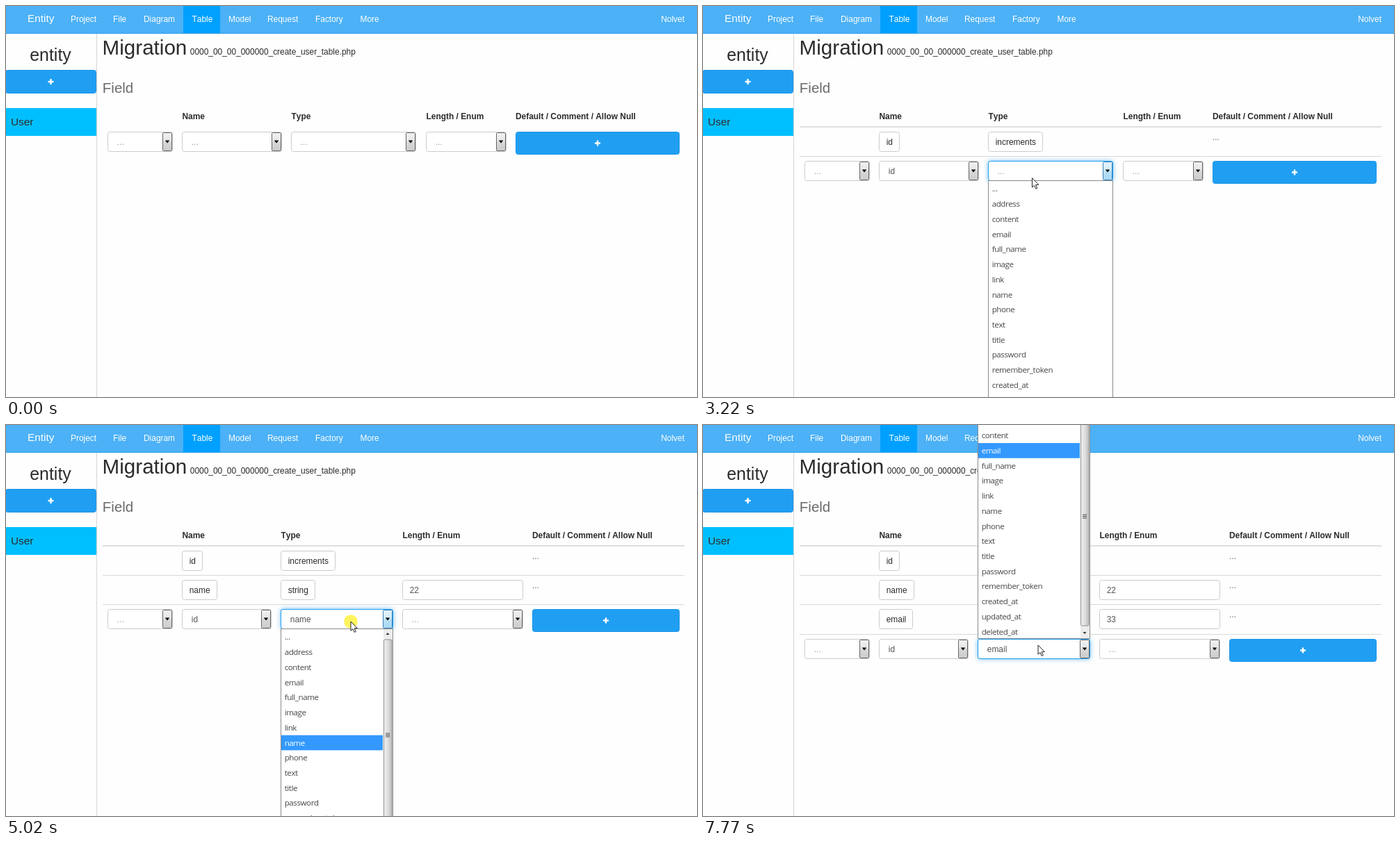
An HTML page with a canvas that plays this animation: 994 px wide and 563 px high, repeating every 8 s.

```html
<!DOCTYPE html>
<html lang="en">
<head>
<meta charset="utf-8">
<title>Entity table editor</title>
<style>
  html, body { margin: 0; width: 100%; height: 100%; overflow: hidden; background: #fefefe; }
  canvas { display: block; width: 100vw; height: 100vh; }
</style>
</head>
<body>
<canvas id="stage" width="994" height="563"></canvas>
<script>
const canvas = document.getElementById('stage');
const ctx = canvas.getContext('2d');
ctx.fontKerning = 'none';
const LOOP = 8000;
const BODY = 11.93;
const SANS = '"Liberation Sans", Arial, sans-serif';
const LIST = '"Open Sans", "Noto Sans", sans-serif';
const DARK = '#2b2b2b', MID = '#555', BLUE = '#209ff2';
const PITCH = 42.2, ITEM = 21.73;

const nav = [['Project', 93], ['File', 154], ['Diagram', 198], ['Table', 267.5],
  ['Model', 320], ['Request', 376], ['Factory', 445], ['More', 509.5]];

const numberItems = ['...', 'id', 'age', 'code', 'count', 'height',
  'number', 'order', 'price', 'status', 'user_id', 'weight'];
const textItems = ['...', 'address', 'content', 'email', 'full_name', 'image', 'link',
  'name', 'phone', 'text', 'title', 'password', 'remember_token',
  'created_at', 'updated_at', 'deleted_at'];

// Column edges before and after the first length field appears.
const wide = { name: [253.5, 396.5], type: [410.5, 589.5], len: [604.5, 719.5], add: [733, 969] };
const tight = { name: [253.5, 381.5], type: [395.5, 556.5], len: [570.5, 743.5], add: [757, 969] };

const rows = [
  { at: 1800, name: 'id', type: 'increments' },
  { at: 4160, name: 'name', type: 'string', len: '22' },
  { at: 6590, name: 'email', type: 'string', len: '33' }
];

// Pointer moves: start, end, steps, x, y.
const moves = [
  [70, 770, 10, 325, 186],
  [850, 850, 1, 331, 196],
  [1170, 1490, 5, 331, 238],
  [1880, 2280, 6, 473, 243],
  [3220, 3930, 10, 491, 412],
  [4240, 4790, 8, 496, 283],
  [5570, 5970, 6, 487, 371],
  [6740, 7140, 6, 477, 323],
  [7300, 7380, 2, 482, 317]
];
const clicks = [[930, 1010], [1650, 1800], [2620, 2750], [4090, 4160],
  [5020, 5100], [6430, 6590], [7530, 7770]];

const between = (t, a, b) => t >= a && t < b;
const smooth = p => p * p * (3 - 2 * p);

function pointer(t) {
  let x = 920, y = 556;
  for (const [start, end, n, tx, ty] of moves) {
    if (t < start) break;
    const gap = (end - start) / Math.max(1, n - 1) || 1;
    const step = Math.min(n, Math.floor((t - start) / gap) + 1);
    const p = smooth(step / n);
    x += (tx - x) * p;
    y += (ty - y) * p;
  }
  return { x, y };
}

function text(s, x, y, size = BODY, color = DARK, weight = 'normal', family = SANS) {
  ctx.font = `${weight} ${size}px ${family}`;
  ctx.fillStyle = color;
  ctx.fillText(s, x, y);
}

function rect(x, y, w, h, color) {
  ctx.fillStyle = color;
  ctx.fillRect(x, y, w, h);
}

function box(x, y, w, h, fill, stroke, r = 3) {
  ctx.beginPath();
  ctx.roundRect(x, y, w, h, r);
  ctx.fillStyle = fill;
  ctx.fill();
  ctx.strokeStyle = stroke;
  ctx.lineWidth = 1;
  ctx.stroke();
}

function triangle(x, y, w, h, color = '#000') {
  ctx.beginPath();
  ctx.moveTo(x - w / 2, y - h / 2);
  ctx.lineTo(x + w / 2, y - h / 2);
  ctx.lineTo(x, y + h / 2);
  ctx.fillStyle = color;
  ctx.fill();
}

function plusButton(x, y, w, h) {
  box(x + .5, y + .5, w - 1, h - 1, BLUE, '#1c94e6');
  const cx = x + w / 2, cy = y + h / 2;
  rect(cx - 4, cy - 1.2, 8, 2.4, '#fff');
  rect(cx - 1.2, cy - 4, 2.4, 8, '#fff');
}

function select([x0, x1], y, value, focus, hot) {
  const w = x1 - x0;
  if (focus) {
    ctx.save();
    ctx.shadowColor = 'rgba(60,165,235,.65)';
    ctx.shadowBlur = 6;
    box(x0, y + .5, w, 28, '#fff', BLUE);
    ctx.restore();
  }
  box(x0, y + .5, w, 28, '#fff', focus ? BLUE : '#ccc');
  text(value, x0 + 13.3, y + 18.5, BODY, value === '...' ? '#999' : MID);
  const shade = ctx.createLinearGradient(0, y, 0, y + 28);
  shade.addColorStop(0, hot ? '#e4f4fd' : '#f2f2f2');
  shade.addColorStop(.48, hot ? '#d2ecfb' : '#e6e6e6');
  shade.addColorStop(.52, hot ? '#b9e1f8' : '#d8d8d8');
  shade.addColorStop(1, hot ? '#a6d8f4' : '#cbcbcb');
  box(x1 - 14, y + 1.5, 13, 26, shade, hot ? '#3c7fb1' : '#666', 1);
  triangle(x1 - 7.5, y + 14.5, 6.5, 3.8);
}

function tag(label, x, y) {
  ctx.font = `${BODY}px ${SANS}`;
  box(x, y + .5, Math.round(ctx.measureText(label).width + 20), 28, '#fff', '#ccc');
  text(label, x + 10.2, y + 18.5);
}

function scrollbar(x, top, bottom, thumbTop, thumbEnd, grip) {
  rect(x, top, 13, bottom - top, '#ececec');
  const shade = ctx.createLinearGradient(x, 0, x + 13, 0);
  shade.addColorStop(0, '#f0f0f0');
  shade.addColorStop(.5, '#dedede');
  shade.addColorStop(1, '#b9b9b9');
  box(x + .5, thumbTop, 11.5, thumbEnd - thumbTop, shade, '#909090', 1.5);
  for (let i = -1; i < 2; i++) rect(x + 3, grip + i * 2.4, 6, 1, '#444');
}

function popup([x0, x1], top, items, selected, mouse, bar) {
  const h = items.length * ITEM;
  box(x0, top, x1 - x0, h, '#fff', '#8a8a8a', 0);
  const hover = Math.floor((mouse.y - top - 1) / ITEM);
  const lit = hover > 0 && hover < items.length ? hover : selected;
  const right = bar ? x1 - 14.5 : x1 - .5;
  ctx.letterSpacing = '-0.45px';
  items.forEach((item, i) => {
    const y = top + 1 + i * ITEM;
    const on = i === lit && i > 0;
    if (on) rect(x0 + .5, y, right - x0 - .5, ITEM, '#3399ff');
    text(item, x0 + 5.2, y + 14.9, 11.6, on ? '#fff' : '#484848', 'normal', LIST);
  });
  ctx.letterSpacing = '0px';
  if (bar) {
    scrollbar(x1 - 13.5, top + .5, top + h - .5, ...bar);
    triangle(x1 - 7.5, top + 7, 5, -3, '#333');
    triangle(x1 - 7.5, top + h - 8, 5, 3, '#333');
  }
}

function navBar() {
  rect(0, 0, 994, 39, '#4cb1f6');
  rect(0, 39, 994, 1, '#2f9fe9');
  rect(255, 0, 53, 39, '#00a0ff');
  text('Entity', 31, 23.3, 15.35, '#fff');
  for (const [label, x] of nav) text(label, x, 22.5, BODY, '#fff');
  ctx.textAlign = 'right';
  text('Nolvet', 976, 22.5, BODY, '#fff');
  ctx.textAlign = 'left';
}

function sidebar() {
  rect(130, 40, 1, 523, '#d5d5d5');
  ctx.textAlign = 'center';
  text('entity', 64, 78.8, 24.9);
  ctx.textAlign = 'left';
  plusButton(-1, 92, 131, 34);
  rect(0, 147, 130, 40, '#00bfff');
  text('User', 7, 172.3, 15.35);
}

function table(t, col) {
  text('Migration', 138.6, 69.7, 29.6);
  text('0000_00_00_000000_create_user_table.php', 264.8, 69.7);
  text('Field', 138.8, 124.6, 20.5, '#6b6b6b');

  const heads = { name: 'Name', type: 'Type', len: 'Length / Enum',
    add: 'Default / Comment / Allow Null' };
  for (const key in heads) text(heads[key], col[key][0], 162.6, BODY, DARK, 'bold');

  const rowTop = i => Math.round(181 + i * PITCH);
  const shown = rows.filter(r => t >= r.at);
  shown.forEach((row, i) => {
    const y = rowTop(i);
    if (i === 0) rect(139, 173.2, 837, 1.6, '#d8d8d8');
    rect(139, rowTop(i + 1) - 7, 837, 1, '#d9d9d9');
    tag(row.name, col.name[0], y);
    tag(row.type, col.type[0], y);
    if (row.len) {
      const [a, b] = col.len;
      box(a, y + .5, b - a, 28, '#fff', '#ccc');
      text(row.len, a + 10.2, y + 18.5, BODY, MID);
    }
    text('...', col.add[0], y + 12.3, BODY, '#666');
  });

  const y = rowTop(shown.length);
  const onName = between(t, 930, 2690), onType = t >= 2690;
  const type = t < 4160 ? '...' : t < 6590 ? 'name' : 'email';
  select([146.5, 239.5], y, '...');
  select(col.name, y, t < 1800 ? '...' : 'id', onName);
  select(col.type, y, type, onType, between(t, 2690, 6590));
  select(col.len, y, '...');
  plusButton(col.add[0], y, col.add[1] - col.add[0], 33);
  return y;
}

function lists(t, col, y, mouse) {
  const below = y + 28.5;
  if (between(t, 930, 1800)) popup(col.name, below, numberItems, 0, mouse);
  if (between(t, 2690, 4160)) popup(col.type, below, textItems, 0, mouse);
  if (between(t, 5020, 6590)) popup(col.type, below, textItems, 7, mouse, [309, 583, 446]);
  if (t >= 7610) {
    const top = y - .5 - textItems.length * ITEM;
    popup(col.type, top, textItems, 3, { y: top }, [-27, 289, 131]);
  }
}

function arrow({ x, y }) {
  const shape = [[0, 0], [0, 13.3], [3, 10.6], [5.2, 15.4], [7.3, 14.5], [5.1, 9.8], [9.3, 9.6]];
  ctx.beginPath();
  for (const [dx, dy] of shape) ctx.lineTo(x + dx, y + dy);
  ctx.closePath();
  ctx.fillStyle = '#fff';
  ctx.fill();
  ctx.strokeStyle = '#222';
  ctx.lineWidth = 1;
  ctx.stroke();
}

function draw(t) {
  const col = t < 4160 ? wide : tight;
  const mouse = pointer(t);
  rect(0, 0, 994, 563, '#fefefe');
  navBar();
  sidebar();
  const y = table(t, col);
  lists(t, col, y, mouse);
  if (clicks.some(([a, b]) => between(t, a, b))) {
    ctx.beginPath();
    ctx.arc(mouse.x, mouse.y, 9.8, 0, Math.PI * 2);
    ctx.fillStyle = 'rgba(255,240,40,.75)';
    ctx.fill();
  }
  if (t >= 70) arrow(mouse);
}

function tick(now) {
  draw(now % LOOP);
  requestAnimationFrame(tick);
}
draw(0);
requestAnimationFrame(tick);
</script>
</body>
</html>
```
